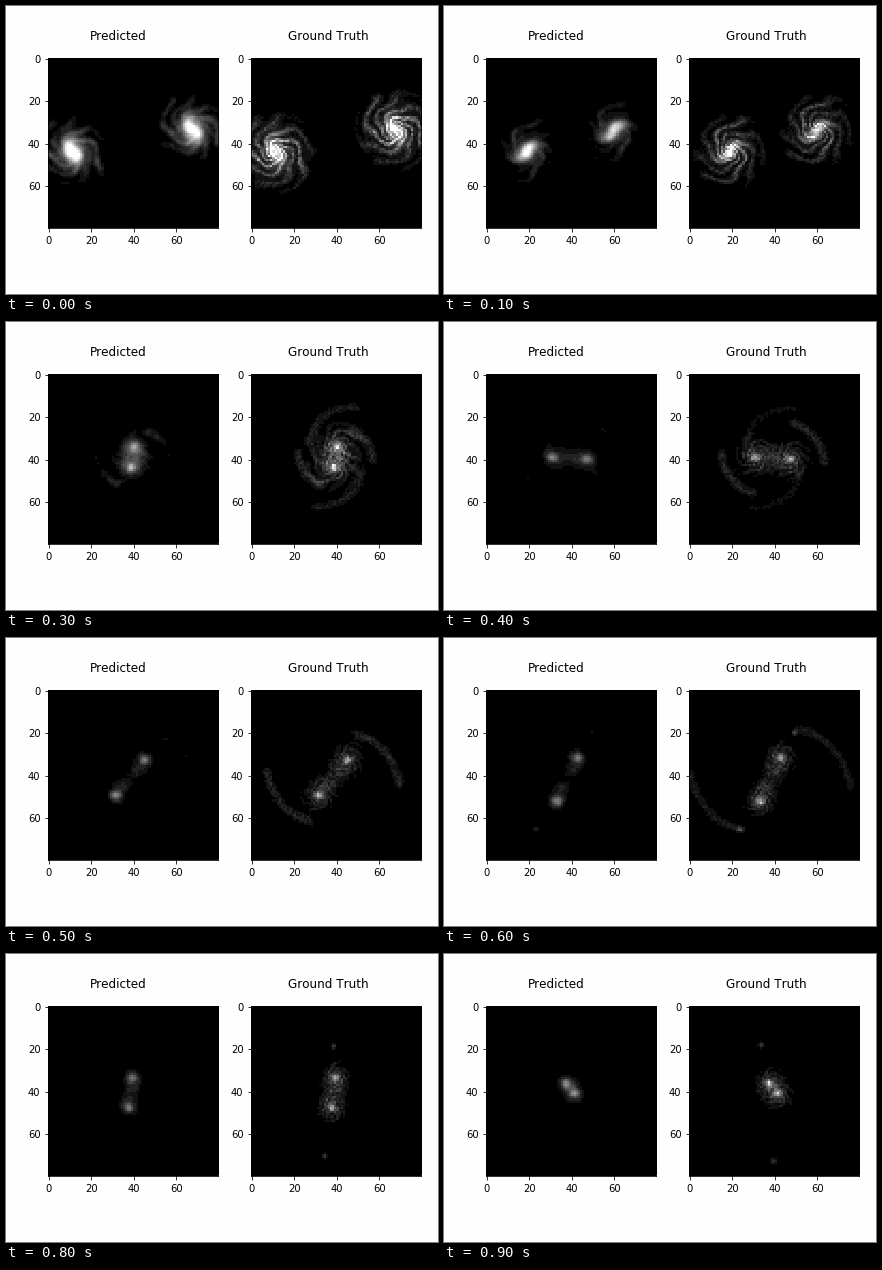
Recreate the animation shown at these times as a matplotlib script. Size 432 px wide and 288 px high, loop 1 s.

```python
import numpy as np
import matplotlib.pyplot as plt
from matplotlib.animation import FuncAnimation

W, H, DPI = 432, 288, 72
N, FRAMES = 80, 10
plt.rcParams["font.family"] = "DejaVu Sans"
plt.rcParams["text.kerning_factor"] = 6

Y, X = np.mgrid[0:N, 0:N].astype(float)
GRAIN = np.random.default_rng(4).uniform(0.6, 1.25, (N, N))


def cores(t):
    """Both galaxy centres: fall inwards, swing past each other, merge."""
    if t < 3:
        r = 28.5 - 7.6 * t
    else:
        r = 3 + 8.4 * np.sin(np.pi * (t - 2.6) / 6.4)
    swing = 1 / (1 + np.exp(-1.7 * (t - 3.5)))
    angle = np.radians(190 + 238 * swing + 15 * max(0, t - 7) ** 2)
    drift = max(0, np.sin(np.pi * (t - 3.7) / 5.3))
    middle = np.array([39 - 1.5 * drift, 39 + 3.2 * drift])
    offset = r * np.array([np.cos(angle), -np.sin(angle)])
    return middle, middle + offset, middle - offset


def galaxy(center, t):
    """Bent bar inside a disc of clockwise spiral arms."""
    merged = np.clip(t - 2, 0, 1)
    length = 6.5 - 4.8 * merged
    width = 3.2 - 0.85 * min(t, 2) + 0.1 * merged
    dx, dy = X - center[0], Y - center[1]
    r = np.hypot(dx, dy)
    theta = np.arctan2(dy, dx) - np.radians(25 - 100 * min(t, 2))
    phi = theta - 0.1 * r
    bar = np.exp(-(r * np.cos(phi) / length) ** 2
                 - (r * np.sin(phi) / width) ** 2)

    wind = theta - 2.3 * np.log1p(r) + 0.25 * np.sin(3 * theta + 0.4 * r)
    arms = (0.5 + 0.5 * np.cos(6 * wind)) ** 1.6 * (0.8 + 0.3 * np.cos(2 * wind))
    radius = 8 + 11 * np.exp(-(t / 3.5) ** 2)
    edge = 1 / (1 + np.exp(r - radius))
    disc = (0.25 + 0.9 * arms) * np.exp(-r / 10) * edge * GRAIN
    return (0.7 - 0.2 * merged) * bar + max(0.2, 1.2 * 0.68 ** t) * disc


def stroke(xs, ys, width):
    """Soft, grainy line along a sampled path."""
    d2 = np.min((X[..., None] - xs) ** 2 + (Y[..., None] - ys) ** 2, axis=-1)
    return np.exp(-d2 / width ** 2) * GRAIN


def tail_pair(middle, start, stop, near, far):
    """Two arcs facing each other across the middle."""
    s = np.linspace(0, 1, 60)
    radius = near + (far - near) * s
    image = 0
    for turn in (0, 180):
        angle = np.radians(start + (stop - start) * s + turn)
        image = image + stroke(middle[0] + radius * np.cos(angle),
                               middle[1] + radius * np.sin(angle), 2.2)
    return image


def knot(x, y):
    return 0.27 * np.exp(-((X - x) ** 2 + (Y - y) ** 2) / 1.8)


def density(t):
    middle, a, b = cores(t)
    image = galaxy(a, t) + galaxy(b, t)
    if t > 2:
        image += 0.17 * stroke(*np.linspace(a, b, 40).T, 5)
        reach, spread = 5.4 * t, 1.3 * (t - 2)
        fade = 0.18 * np.clip((9 - t) / 4, 0, 1)
        image += fade * tail_pair(middle, -60, 5, reach - spread, reach + spread)
        loops = 0.14 * np.clip((6 - t) / 3, 0, 1)
        image += loops * tail_pair(middle, -150, -68, 14, 25)
    if t > 5:
        image += knot(54 - 5.2 * (t - 5), 23 - t / 2)
        image += knot(18 + 5.3 * (t - 5), 63 + 2.5 * (t - 5))
    return image


def blur(image, sigma):
    k = np.arange(N)
    kernel = np.exp(-(k[:, None] - k) ** 2 / (2 * sigma ** 2))
    kernel /= kernel.sum(axis=1, keepdims=True)
    return kernel @ image @ kernel.T


def posterize(image):
    return np.floor(np.clip(image, 0, 1) * 15) / 15


def panel(left, title, title_x):
    ax = fig.add_axes([left / W, 1 - 221.5 / H, 170.5 / W, 170 / H],
                      facecolor="black")
    picture = ax.imshow(np.zeros((N, N)), cmap="gray", vmin=0, vmax=1,
                        interpolation="nearest", aspect="auto")
    ax.set_xticks(range(0, N, 20))
    ax.set_yticks(range(0, N, 20))
    ax.tick_params(axis="x", pad=4.5)
    fig.text(title_x / W, 1 - 34 / H, title, fontsize=12)
    return picture


def update(t):
    truth = density(t)
    predicted.set_data(posterize(1.25 * blur(truth, 1) - 0.12))
    actual.set_data(posterize(truth))
    return predicted, actual


fig = plt.figure(figsize=(W / DPI, H / DPI), dpi=DPI, facecolor="#fefefe")
predicted = panel(41.5, "Predicted", 84)
actual = panel(244.5, "Ground Truth", 281.5)
anim = FuncAnimation(fig, update, frames=FRAMES, interval=100,
                     repeat=True, repeat_delay=0)
plt.show()
```
